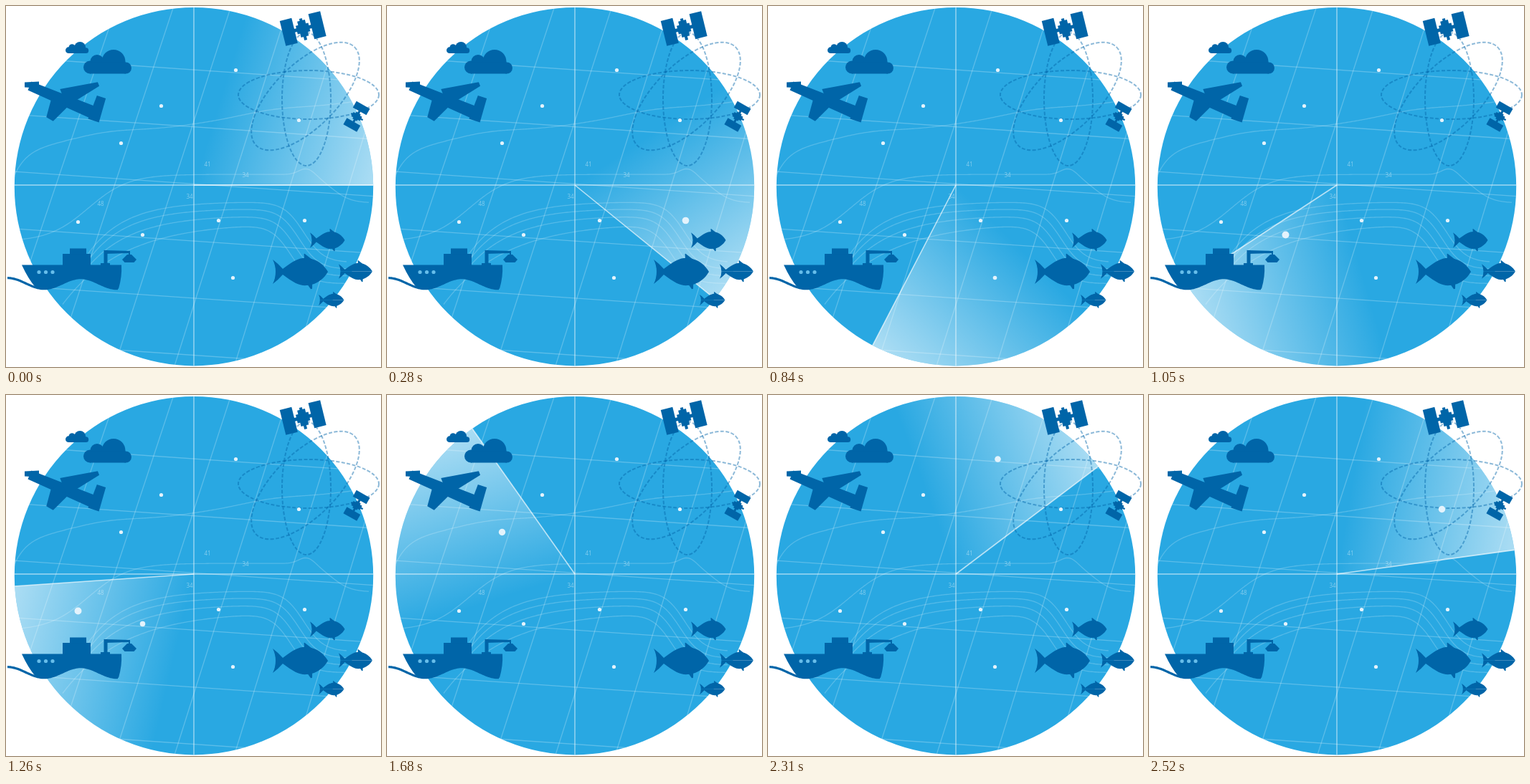
These frames come from a looping animation (523x504 px, 2.59 s). An HTML page with a canvas:

```html
<!DOCTYPE html>
<html lang="en">
<head>
<meta charset="utf-8">
<title>Radar</title>
<style>
html, body { margin: 0; width: 100%; height: 100%; overflow: hidden; background: #fff; }
canvas { display: block; }
</style>
</head>
<body>
<canvas id="stage" width="523" height="504"></canvas>
<script>
const ctx = document.getElementById('stage').getContext('2d');
const W = 523, H = 504;
const BASE = '#29a8e2', DARK = '#0065a8';
const CX = 262, CY = 250, DISC_Y = 252.2, R = 250.2;
const STEP_MS = 70, STEPS = 37, STEP_DEG = 9.785;

const rad = deg => deg * Math.PI / 180;
const white = a => `rgba(255,255,255,${a})`;
const bump = (x, mid, width) => Math.exp(-(((x - mid) / width) ** 2));
const rise = (x, mid, width) => 1 / (1 + Math.exp((mid - x) / width));
const decay = (x, from, length) => Math.exp((from - x) / length);

const blips = [
  [416.5, 299.5], [296.5, 299.5], [316.5, 379.5], [190.5, 319.5], [100.5, 301.5],
  [160.5, 191.5], [216.5, 139.5], [320.5, 89.5], [408.5, 159.5]
];

function circle(x, y, r) {
  ctx.beginPath();
  ctx.arc(x, y, r, 0, 2 * Math.PI);
  ctx.fill();
}

function line(x1, y1, x2, y2) {
  ctx.beginPath();
  ctx.moveTo(x1, y1);
  ctx.lineTo(x2, y2);
  ctx.stroke();
}

function trace(f, from, to) {
  for (let x = from; x <= to; x += 2) ctx.lineTo(x, f(x));
}

function plot(f, from, to) {
  ctx.beginPath();
  trace(f, from, to);
  ctx.stroke();
}

// Straight limb that is w1 wide at its first end and w2 at the other.
function taper(x1, y1, w1, x2, y2, w2) {
  const len = Math.hypot(x2 - x1, y2 - y1);
  const nx = (y1 - y2) / len / 2, ny = (x2 - x1) / len / 2;
  ctx.beginPath();
  ctx.moveTo(x1 + nx * w1, y1 + ny * w1);
  ctx.lineTo(x2 + nx * w2, y2 + ny * w2);
  ctx.lineTo(x2 - nx * w2, y2 - ny * w2);
  ctx.lineTo(x1 - nx * w1, y1 - ny * w1);
  ctx.fill();
}

function block(cx, cy, w, h) {
  ctx.fillRect(cx - w / 2, cy - h / 2, w, h);
}

function placed(x, y, deg, scale, draw) {
  ctx.save();
  ctx.translate(x, y);
  ctx.rotate(rad(deg));
  ctx.scale(scale, scale);
  draw();
  ctx.restore();
}

function drawGrid() {
  ctx.lineWidth = 1.3;
  ctx.strokeStyle = white(0.24);
  for (let i = 0; i < 6; i++) {
    line(154 + 80 * i, 0, 83.5 * i - 16, H);
    const y = 71 + 79.7 * i;
    line(0, y, W, y + 36);
  }
}

function drawContours() {
  ctx.strokeStyle = white(0.2);
  plot(x => 196 - 0.14 * (x - 40) + 36 * decay(x, 12, 18)
    - 6 * bump(x, 140, 60) - 5 * bump(x, 370, 60), 12, 500);
  plot(x => 235 + 94 * rise(-x, -115, 28) + 40 * rise(x, 455, 13) - 10 * bump(x, 420, 16), 22, 506);
  for (let i = 0; i < 4; i++) {
    const spread = (i / 3) ** 3, start = 113 - 34 * spread;
    plot(x => 273 + 9.5 * i + (75 + 40 * spread) * decay(x, start, 52 + 34 * spread)
      + 85 * rise(x, 415 - 6 * i, 14), start, 476);
  }
}

function drawLabels() {
  ctx.fillStyle = white(0.4);
  ctx.font = '8px "Noto Sans", sans-serif';
  ctx.textAlign = 'center';
  ctx.textBaseline = 'middle';
  for (const [n, x, y] of [[41, 281, 222], [34, 334, 237], [34, 256, 266.5], [48, 132, 277]])
    ctx.fillText(n, x, y);
}

function drawAxes() {
  ctx.strokeStyle = white(0.55);
  ctx.lineWidth = 1.4;
  line(CX, 0, CX, H);
  line(0, CY, W, CY);
}

function drawSweep(deg) {
  const edge = rad(deg), axis = rad(deg + 17);
  const g = ctx.createLinearGradient(CX, CY, CX + R * Math.cos(axis), CY + R * Math.sin(axis));
  g.addColorStop(0, white(0));
  g.addColorStop(1, white(0.64));
  ctx.fillStyle = g;
  ctx.beginPath();
  ctx.moveTo(CX, CY);
  ctx.arc(CX, CY, R + 10, edge - Math.PI / 2, edge);
  ctx.fill();
  ctx.strokeStyle = white(0.65);
  ctx.lineWidth = 1.6;
  line(CX, CY, CX + 260 * Math.cos(edge), CY + 260 * Math.sin(edge));
}

// A blip swells just after the edge passes it, then eases back.
function blipRadius(x, y, sweep) {
  const angle = (Math.atan2(y - CY, x - CX) * 180 / Math.PI + 360) % 360;
  const past = sweep - angle;
  if (past <= 0 || past >= 52) return 2.6;
  if (past < 10) return 2.6 + 0.24 * past;
  return 5 - 2.4 * ((past - 10) / 42) ** 2;
}

function orbit(x, y, rx, ry, deg) {
  ctx.beginPath();
  ctx.ellipse(x, y, rx, ry, rad(deg), 0, 2 * Math.PI);
  ctx.stroke();
}

function drawOrbits() {
  ctx.strokeStyle = 'rgba(0,101,168,0.45)';
  ctx.lineWidth = 2;
  ctx.setLineDash([5, 2.5]);
  orbit(422, 124, 98, 34, 0);
  orbit(419, 130, 34, 93, 0);
  orbit(417.5, 126, 97, 44, -45);
  ctx.setLineDash([]);
}

function satellite(x, y, deg, scale, reach) {
  placed(x, y, deg, scale, () => {
    for (const side of [-reach, reach]) block(side, 0, 17, 36);
    block(0, 0, reach * 2, 5);
    block(0, 0, 18, 12);
    block(0, 0, 11, 23);
    block(0, 1, 4, 31);
  });
}

function fish(x, y, scale) {
  placed(x, y, 0, scale, () => {
    for (const flip of [-1, 1]) {
      ctx.beginPath();
      ctx.moveTo(4, 0);
      ctx.quadraticCurveTo(4, 9 * flip, 0, 17 * flip);
      ctx.quadraticCurveTo(8, 11 * flip, 14, 4 * flip);
      ctx.bezierCurveTo(30, 16 * flip, 38, 20 * flip, 48, 19 * flip);
      ctx.bezierCurveTo(62, 18 * flip, 72, 9 * flip, 77, 0);
      ctx.fill();
    }
    taper(50, -14, 12, 44, -25, 1);
    taper(51, 14, 9, 54, 24, 2);
  });
}

function cloud(x, y, scale) {
  placed(x, y, 0, scale, () => {
    circle(9, -9, 9);
    circle(19, -17, 9.5);
    circle(42, -17, 16.5);
    circle(59, -8, 8);
    block(34, -8, 50, 16);
  });
}

function plane() {
  taper(33, 111.5, 13, 120, 148, 18);
  taper(26, 110, 7, 46, 110, 9);
  taper(80, 128, 26, 129, 109, 6);
  taper(75, 134, 26, 61, 158, 11);
  taper(133, 127, 13, 122, 160, 16);
}

function ship() {
  const wave = x => 387.2 - 7.5 * Math.cos(2 * Math.PI * (x - 2) / 102);
  ctx.beginPath();
  trace(wave, 41, 157);
  ctx.quadraticCurveTo(162, 378, 161, 361.5);
  ctx.lineTo(22, 361.5);
  ctx.quadraticCurveTo(31, 381, 41, wave(41));
  ctx.fill();
  ctx.strokeStyle = DARK;
  ctx.lineWidth = 3.2;
  plot(wave, 2, 157);

  block(98.5, 354, 39, 16);
  block(100.5, 343, 23, 9);
  block(139, 351, 5, 20);
  block(138.5, 360.5, 13, 3);
  taper(137, 343.5, 5, 173, 343.5, 3);
  block(172, 347, 2, 8);
  taper(172, 347, 6, 172, 354, 20);
  taper(172, 354, 20, 172, 358, 13);

  ctx.fillStyle = '#66bdea';
  for (let i = 0; i < 3; i++) circle(46 + 9.5 * i, 371.5, 2.6);
  ctx.fillStyle = DARK;
}

function drawIcons() {
  ctx.fillStyle = DARK;
  satellite(414.2, 31.5, -13.7, 1, 20.5);
  satellite(489, 154.3, -60.5, 0.6, 22.5);
  cloud(108, 94.5, 1);
  cloud(83, 66, 0.48);
  plane();
  ship();
  fish(372, 371, 1);
  fish(424, 327, 0.63);
  fish(464, 370.5, 0.61);
  fish(436, 410.5, 0.46);
}

function render(now) {
  const sweep = Math.floor(now / STEP_MS) % STEPS * STEP_DEG;
  ctx.fillStyle = '#fff';
  ctx.fillRect(0, 0, W, H);
  ctx.save();
  ctx.fillStyle = BASE;
  circle(CX, DISC_Y, R);
  ctx.clip();
  drawGrid();
  drawContours();
  drawLabels();
  drawAxes();
  drawSweep(sweep);
  ctx.restore();
  drawOrbits();
  ctx.fillStyle = '#e4f3fc';
  for (const [x, y] of blips) circle(x, y, blipRadius(x, y, sweep));
  drawIcons();
}

const start = performance.now();
function tick() {
  render(performance.now() - start);
  requestAnimationFrame(tick);
}
tick();
</script>
</body>
</html>
```
